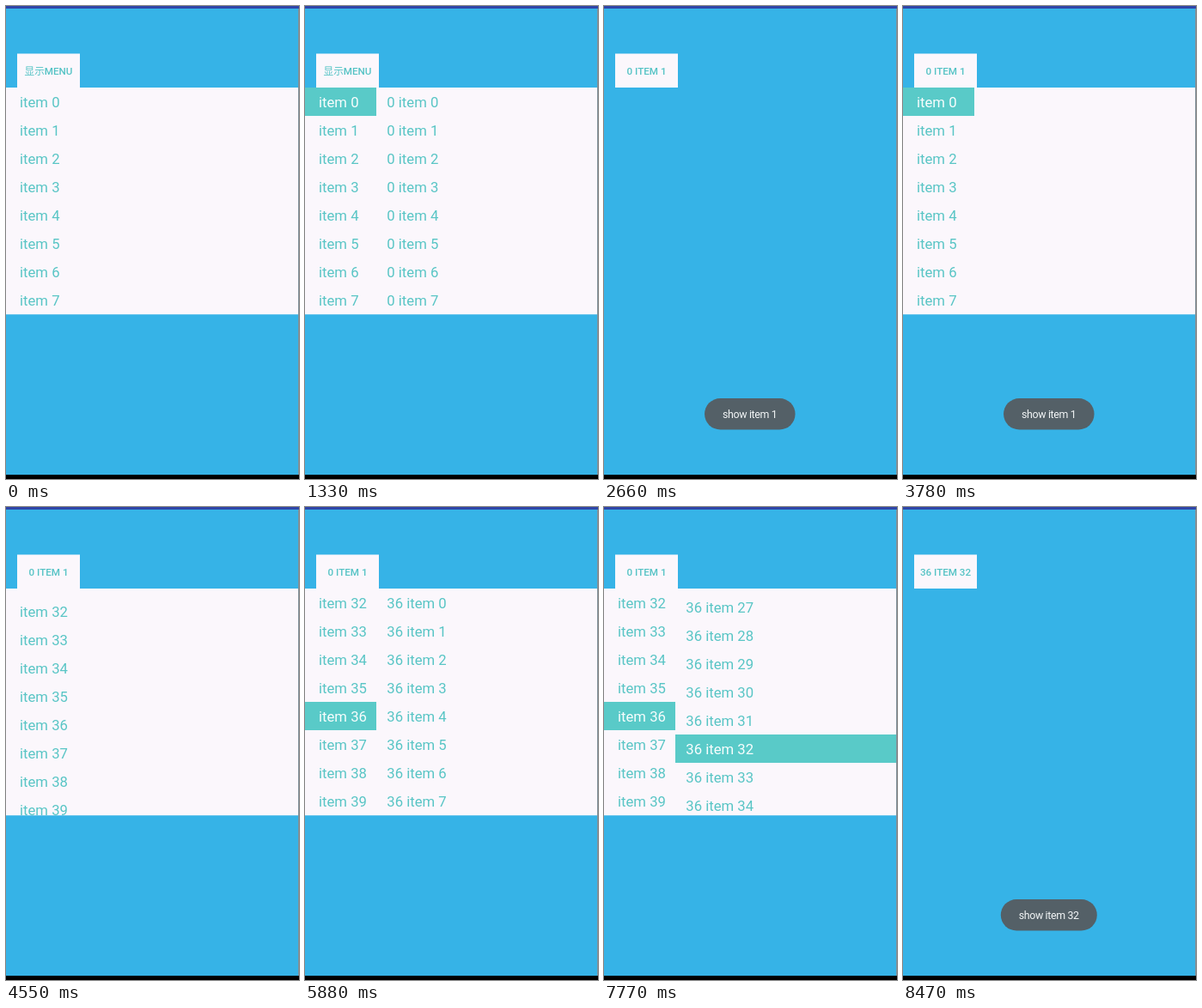
These frames come from a looping animation (341 by 551 pixels, 9520 ms). An HTML page:

```html
<!DOCTYPE html>
<html lang="zh">
<head>
<meta charset="utf-8">
<title>Two-level menu</title>
<style>
  html, body { margin: 0; width: 100%; height: 100%; overflow: hidden; background: #36b3e7; }
  svg { display: block; width: 341px; height: 551px; font-family: Roboto, "Noto Sans CJK SC", "Noto Sans CJK", sans-serif; }
  .list { font-size: 16.7px; }
  .button { font-size: 11.65px; font-weight: 500; fill: #55c3c5; text-anchor: middle; }
  .button .han { font-weight: 400; }
  .toast { font-size: 12.4px; letter-spacing: -0.35px; fill: #f3f6f7; text-anchor: middle; }
</style>
</head>
<body>
<svg viewBox="0 0 341 551">
  <defs>
    <clipPath id="panel"><rect y="95" width="340" height="264.5"/></clipPath>
  </defs>
  <rect width="341" height="551" fill="#36b3e7"/>
  <rect width="341" height="3" fill="#3046a8"/>
  <rect x="13" y="55.5" width="73" height="39.5" fill="#fbf7fc"/>
  <text id="label" class="button" x="49.5" y="80"></text>
  <g id="menu">
    <g clip-path="url(#panel)">
      <rect y="95" width="340" height="264.5" fill="#fbf7fc"/>
      <g id="left" class="list"></g>
      <g id="right" class="list"></g>
    </g>
  </g>
  <g id="toast">
    <rect id="pill" y="457" height="36.5" rx="18.25" fill="#546067"/>
    <text id="message" class="toast" x="169.7" y="480.4"></text>
  </g>
  <rect x="340" y="3" width="1" height="543" fill="#7f8f98"/>
  <rect y="546" width="341" height="5" fill="#000"/>
</svg>
<script>
const LOOP = 9520, STEP = 70;
const TOP = 95, ROW = 33, VISIBLE = 9;
const TEAL = '#58c5c5', MARK = '#59cac8', WHITE = '#f8fdfd';

const $ = id => document.getElementById(id);
const ramp = (t, from, to) => Math.min(1, Math.max(0, (t - from) / (to - from)));
const easeOut = (u, power) => 1 - Math.pow(1 - u, power);

function add(parent, name, attrs) {
  const el = document.createElementNS('http://www.w3.org/2000/svg', name);
  set(el, attrs);
  parent.appendChild(el);
  return el;
}

function set(el, attrs) {
  for (const key in attrs) el.setAttribute(key, attrs[key]);
}

function makeList(root, x, width, textX) {
  const mark = add(root, 'rect', { x, width, height: ROW, fill: MARK });
  const rows = Array.from({ length: VISIBLE }, () => add(root, 'text', { x: textX }));
  return (scroll, selected, prefix) => {
    const first = Math.floor(scroll / ROW);
    mark.setAttribute('visibility', selected < 0 ? 'hidden' : 'inherit');
    mark.setAttribute('y', TOP + selected * ROW - scroll);
    rows.forEach((row, i) => {
      const n = first + i;
      row.textContent = prefix + 'item ' + n;
      set(row, { y: TOP + n * ROW - scroll + 23.4, fill: n === selected ? WHITE : TEAL });
    });
  };
}

const drawLeft = makeList($('left'), 0, 83, 16);
const drawRight = makeList($('right'), 83, 257, 95.3);

function drawMenu(t) {
  const shown = t < 2500 ? 1 - ramp(t, 1893, 2193)
    : t < 5000 ? ramp(t, 3150, 3450)
    : 1 - ramp(t, 7843, 8143);
  set($('menu'), {
    opacity: shown,
    transform: `translate(0 ${26.4 * (1 - shown)})`,
    visibility: shown > 0 ? 'visible' : 'hidden'
  });

  // A fast fling, then a slow settle onto the last row.
  const leftScroll = 1046.4 * easeOut(ramp(t, 3780, 4550), 2.4)
    + 9.6 * easeOut(ramp(t, 4550, 4970), 1.3);
  const rightScroll = 886 * easeOut(ramp(t, 6230, 7560), 2.76);
  const parent = t < 490 ? -1 : t < 5460 ? 0 : 36;
  const child = t < 1820 ? -1 : t < 2500 ? 1 : t < 7770 ? -1 : 32;
  const open = (t >= 490 && t < 2500) || t >= 5460;

  drawLeft(leftScroll, parent, '');
  $('right').setAttribute('visibility', open ? 'inherit' : 'hidden');
  drawRight(rightScroll, child, parent + ' ');
}

function drawButton(t) {
  const html = t < 1890 ? '<tspan class="han">显示</tspan>MENU'
    : t < 7910 ? '0 ITEM 1' : '36 ITEM 32';
  if ($('label').innerHTML !== html) $('label').innerHTML = html;
}

function drawToast(t) {
  const second = t > 6000;
  const width = second ? 112 : 105.5;
  const alpha = second ? ramp(t, 7970, 8470)
    : ramp(t, 2030, 2530) * (1 - ramp(t, 3850, 4350));
  $('toast').setAttribute('opacity', alpha);
  set($('pill'), { x: 169.8 - width / 2, width });
  $('message').textContent = second ? 'show item 32' : 'show item 1';
}

function draw(ms) {
  const t = Math.floor((ms % LOOP) / STEP) * STEP;
  drawMenu(t);
  drawButton(t);
  drawToast(t);
}

const start = performance.now();
function tick() {
  draw(performance.now() - start);
  requestAnimationFrame(tick);
}
tick();
</script>
</body>
</html>
```
